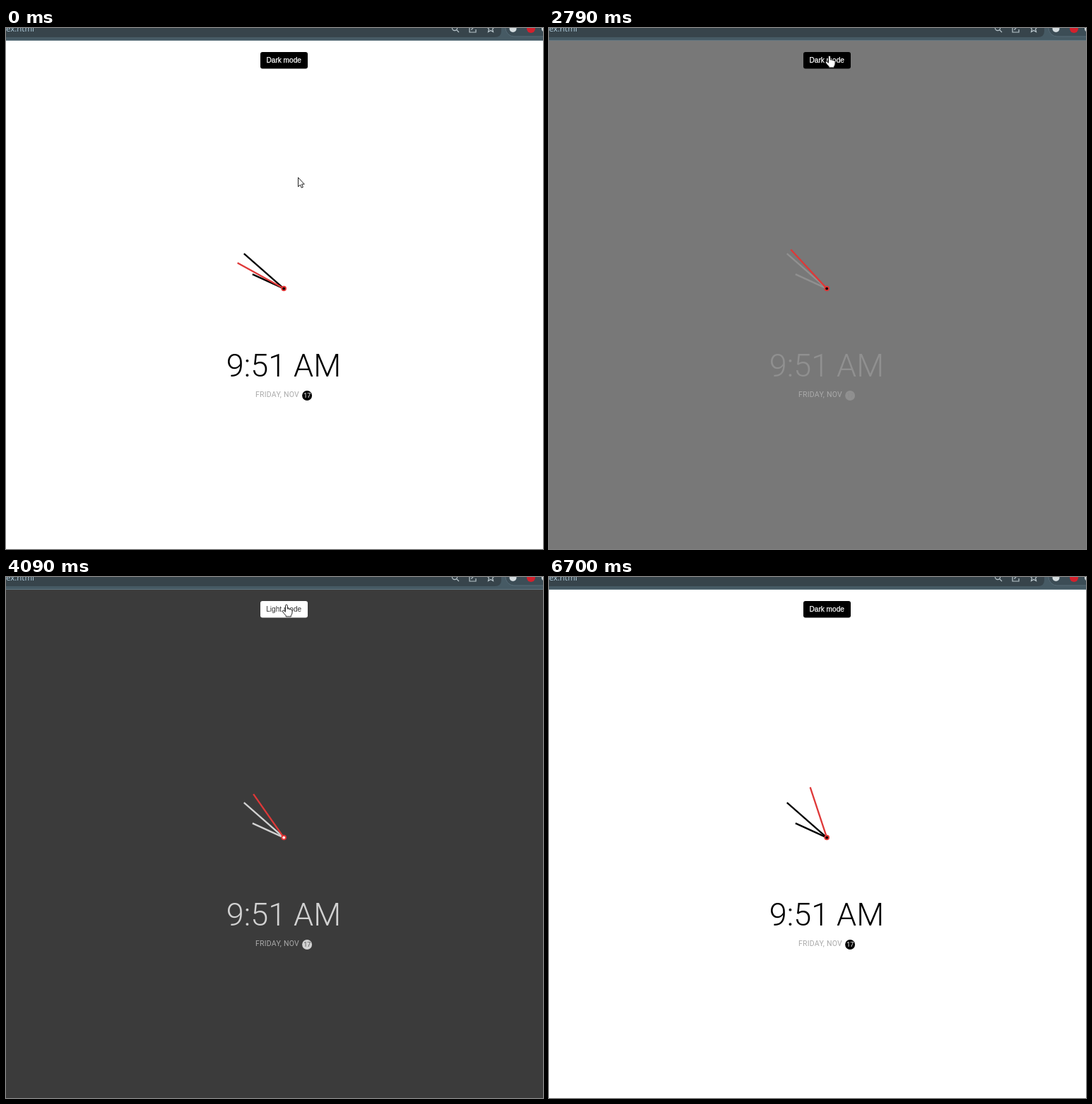
These frames come from a looping animation (760 px wide and 737 px high, 6730 ms). An HTML page:

```html
<!DOCTYPE html>
<html lang="en">
<head>
<meta charset="utf-8">
<title>Theme clock</title>
<style>
  html, body { margin: 0; width: 100%; height: 100%; overflow: hidden; }
  svg { display: block; }
  text { font-family: Roboto, sans-serif; text-anchor: middle; }
  .needle { stroke-width: 2.3; }
  .icon { fill: none; stroke: #b9c6cc; stroke-width: 1.2; }
</style>
</head>
<body>
<svg width="760" height="737" viewBox="0 0 760 737">
  <rect id="page" width="760" height="737"/>

  <rect width="760" height="17.5" fill="#465a64"/>
  <path d="M0 0H701V4Q701 13 692 13H0Z" fill="#37444b"/>
  <path d="M0 17.5H760" stroke="#617680" stroke-width="1"/>
  <rect x="707" y="-14" width="80" height="26" rx="12" fill="#3c4d56" stroke="#566b76"/>
  <text x="40" y="5" font-size="11.5" fill="#b4d0e0" style="font-family:'Open Sans',sans-serif;text-anchor:end">index.html</text>
  <g class="icon">
    <circle cx="635" cy="0" r="3.6"/>
    <path d="M637.6 2.6L641 6"/>
    <path d="M656 -2V6H665V2M659 3Q659 -1 666 -1"/>
    <path d="M686 -5L687.5 -1H691L688.5 1.5L689.5 5.5L686 3.4L682.5 5.5L683.5 1.5L681 -1H684.5Z"/>
  </g>
  <circle cx="717.5" cy="1" r="5" fill="#d5dde0"/>
  <circle cx="743" cy="1" r="6" fill="#d3202c"/>
  <circle cx="763" cy="1" r="5" fill="#d5dde0"/>

  <rect id="button" x="360" y="34" width="67" height="23.5" rx="3"/>
  <text id="label" x="393.2" y="49.3" font-size="10.1" stroke-width=".25" style="font-family:'Liberation Sans',Arial,sans-serif"></text>

  <g transform="translate(393.2 368.6)">
    <path class="needle primary" d="M0 0V-48.75" transform="rotate(294.55)"/>
    <path class="needle primary" d="M0 0V-75" transform="rotate(311.19)"/>
    <path class="needle" id="second" d="M0 0V-75" stroke="#df3838"/>
    <circle r="3.75" fill="#e53535"/>
    <circle id="pin" r="1.9"/>
  </g>

  <text id="time" x="393" y="493" font-size="45" font-weight="300">9:51 AM</text>
  <text x="353" y="522" font-size="10.5" letter-spacing=".22" fill="#aaa" style="text-anchor:start">FRIDAY, NOV</text>
  <circle id="badge" cx="426.1" cy="520" r="7"/>
  <text id="day" x="426.2" y="523" font-size="9">17</text>

  <g id="cursor" fill="#fff" stroke="#222" stroke-linejoin="round">
    <path id="arrow" d="M.5 .5V13.5L3.4 10.8L5.3 15L7.4 14.1L5.5 10H9.3Z"/>
    <path id="hand" d="M-1.5 9V1.2Q-1.5 -.3 -.1 -.3Q1.3 -.3 1.3 1.2V5.6Q2.6 4.7 3.8 6Q5.1 5.2 6.1 6.6Q8 6.1 8 8V11.5Q7.6 13.5 6.4 15V16.5H-.9V15Q-3.8 12 -5.6 9.4Q-6 7.8 -4.4 7.8Q-3.2 8 -1.5 9.8Z"/>
  </g>
</svg>
<script>
const LOOP = 6730, FADE = 470, TICK = 957, FIRST_TICK = 53;
const clicks = [1370, 2507, 3673, 4706];
// time, x, y of the pointer tip
const path = [[0, 413, 211], [350, 413, 211], [1050, 397, 39.5], [5200, 397, 39.5], [5560, 440, -30], [LOOP, 440, -30]];
const $ = id => document.getElementById(id);
const primaries = document.querySelectorAll('.primary');
const mix = (a, b, p) => a + (b - a) * p;
const clamp = x => Math.max(0, Math.min(1, x));
const gray = v => { v = Math.round(v); return `rgb(${v},${v},${v})`; };

// cubic-bezier(.42, 0, 1, 1)
function easeIn(x) {
  x = clamp(x);
  let lo = 0, hi = 1;
  for (let i = 0; i < 24; i++) {
    const s = (lo + hi) / 2;
    if (1.26 * s * (1 - s) ** 2 + 3 * s * s - 2 * s ** 3 < x) lo = s; else hi = s;
  }
  return 3 * lo * lo - 2 * lo ** 3;
}

function pointer(t) {
  const i = path.findIndex(p => p[0] > t), a = path[i - 1], b = path[i];
  const u = (t - a[0]) / (b[0] - a[0]), e = u * u * (3 - 2 * u);
  return [mix(a[1], b[1], e), mix(a[2], b[2], e)];
}

function draw(t) {
  const done = clicks.filter(c => c <= t).length, dark = done % 2 === 1;
  const e = done ? easeIn((t - clicks[done - 1]) / FADE) : 1;
  const p = dark ? e : 1 - e;
  const primary = gray(255 * p);

  $('page').setAttribute('fill', gray(mix(255, 17, p)));
  primaries.forEach(n => n.setAttribute('stroke', primary));
  $('time').setAttribute('fill', primary);
  $('badge').setAttribute('fill', primary);
  $('day').setAttribute('fill', gray(mix(255, 51, p)));

  const solid = dark ? '#fff' : '#000', ink = dark ? '#333' : '#fff';
  $('button').setAttribute('fill', solid);
  $('pin').setAttribute('fill', solid);
  $('label').setAttribute('fill', ink);
  $('label').setAttribute('stroke', dark ? 'none' : ink);
  $('label').textContent = dark ? 'Light mode' : 'Dark mode';

  const u = (t - FIRST_TICK) / TICK, k = Math.floor(u);
  const sec = 49 + k + easeIn((u - k) * TICK / FADE);
  $('second').setAttribute('transform', `rotate(${sec * 360 / 59})`);

  const [x, y] = pointer(t);
  const over = x > 360 && x < 427 && y > 34 && y < 57.5;
  $('cursor').setAttribute('transform', `translate(${x} ${y})`);
  $('hand').setAttribute('visibility', over ? 'visible' : 'hidden');
  $('arrow').setAttribute('visibility', over ? 'hidden' : 'visible');
}

const start = performance.now();
function frame() {
  draw((performance.now() - start) % LOOP);
  requestAnimationFrame(frame);
}
frame();
</script>
</body>
</html>
```
